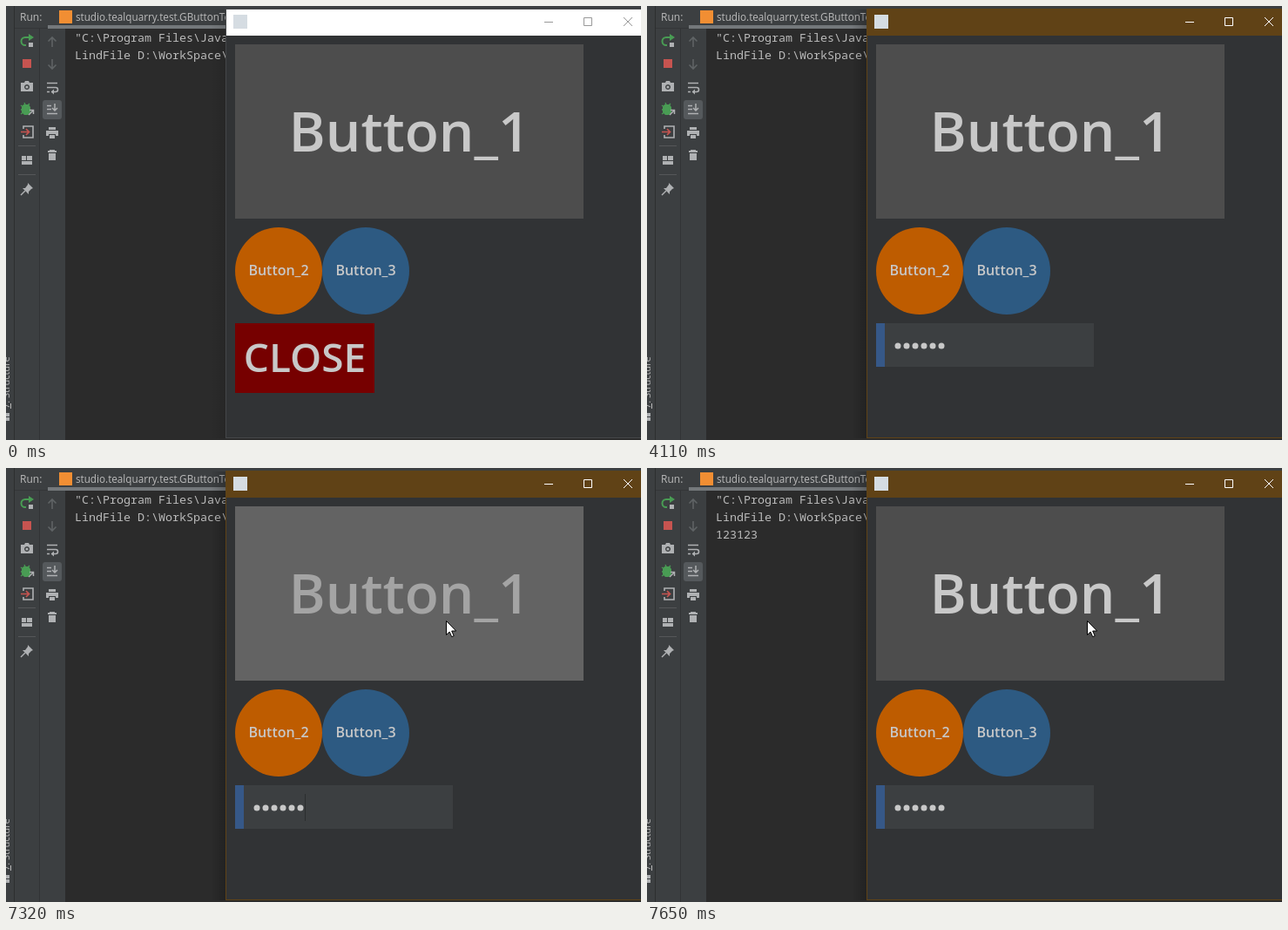
Write an HTML page with a canvas that moves like this. It is 729x498 px and loops after 8 s.

```html
<!DOCTYPE html>
<html lang="en">
<head>
<meta charset="utf-8">
<style>
html, body { margin: 0; height: 100%; overflow: hidden; background: #2b2b2b; }
canvas { display: block; }
</style>
</head>
<body>
<canvas id="stage" width="729" height="498"></canvas>
<script>
const ctx = document.getElementById('stage').getContext('2d');
const LOOP = 8000, STEP = 30;
const UI = '"Open Sans", "Noto Sans", sans-serif';
const MONO = '"Noto Sans Mono", "DejaVu Sans Mono", monospace';
const LIGHT = '#c8c8c8', PANEL = '#3c3f41', ICON = '#afb1b3', DIM = '#5f6365', GREEN = '#499c54', RED = '#c75450';

const FOCUS = 1290, FIELD = 1380, CLOSED = 1590;
const KEYS = [3030, 3090, 3330];
const CARET_BLINK = 475;

// Pointer moves: start, end, cubic path, whether it leaves the window
const MOVES = [
  { from: 360, to: 900, path: [695, 110, 300, 330, 170, 470, 385, 408] },
  { from: 3480, to: 4110, path: [386, 409, 430, 300, 600, 120, 735, 46], leaves: true },
  { from: 4470, to: 4860, path: [699, 109, 430, 230, 330, 420, 423, 412] },
  { from: 5340, to: 5760, path: [423, 412, 470, 290, 620, 110, 735, 40], leaves: true },
  { from: 6660, to: 6930, path: [722, 47, 640, 90, 550, 150, 505, 175] }
];

function rect(x, y, w, h, color) {
  ctx.fillStyle = color;
  ctx.fillRect(x, y, w, h);
}
function disc(x, y, r, color) {
  ctx.fillStyle = color;
  ctx.beginPath();
  ctx.arc(x, y, r, 0, 7);
  ctx.fill();
}
function text(str, x, y, font, color = LIGHT, align = 'left') {
  ctx.font = font;
  ctx.fillStyle = color;
  ctx.textAlign = align;
  ctx.fillText(str, x, y);
}
function stroke(d, color, width = 1.6) {
  ctx.strokeStyle = color;
  ctx.lineWidth = width;
  ctx.stroke(new Path2D(d));
}
function fill(d, color) {
  ctx.fillStyle = color;
  ctx.fill(new Path2D(d), 'evenodd');
}
const clamp = v => Math.max(0, Math.min(1, v));
const gray = v => `rgb(${v},${v},${v})`;
const mix = (a, b, k) => Math.round(a + (b - a) * k);

function drawIcons() {
  // Run column
  stroke('M29 36H22a4 4 0 0 0 0 9h1', GREEN, 2);
  fill('M26 32l6 4-6 4z', GREEN);
  rect(26, 42, 5, 5, ICON);
  rect(19, 61, 10, 10, RED);
  fill('M17 88h4l1-2h4l1 2h4v10H17zM24 90a3 3 0 1 0 .1 0z', ICON);
  disc(24, 93, 1.6, ICON);
  fill('M20 113h6l2 3v6l-3 3h-4l-3-3v-6z', GREEN);
  stroke('M17 114l3 2M17 119h3M17 124l3-2M27 112l-2 2M21 111l1 2', GREEN, 1.4);
  stroke('M26 125l5-5M27 119.500h4.500v4.500', ICON, 1.5);
  stroke('M20 141v-3h11v13H20v-3', ICON, 1.6);
  stroke('M17 144.500h9M23 141l3.500 3.500L23 148', RED, 1.7);
  rect(14, 160, 20, 1, '#555759');
  rect(18, 172, 5, 5, ICON);
  rect(24, 172, 6, 5, ICON);
  rect(18, 178, 12, 4, ICON);
  rect(14, 193, 20, 1, '#555759');
  fill('M25 203l6 6-2 1-3 3v3l-7-7h3l3-4z', ICON);
  stroke('M22 212l-5 5', ICON, 1.5);

  // Console column
  stroke('M53 47V36M48.500 40.500L53 36l4.500 4.500', DIM);
  stroke('M53 61v11M48.500 67.500L53 72l4.500-4.500', DIM);
  stroke('M47 88.500h12M47 93.500h10a2.500 2.500 0 0 1 0 5h-4M47 98.500h3', ICON);
  fill('M55 95.500v6l-3.500-3z', ICON);
  ctx.fillStyle = '#55595c';
  ctx.beginPath();
  ctx.roundRect(42, 108, 22, 22, 3);
  ctx.fill();
  stroke('M47 114.500h5M47 118.500h5M47 123.500h12M56 112v8M53 117l3 3 3-3', ICON, 1.5);
  rect(49, 139, 8, 3, ICON);
  fill('M46 143h14v6h-3v-2h-8v2h-3z', ICON);
  rect(50, 148, 6, 4, ICON);
  fill('M48 166h2v-1h6v1h2v2H48zM49 169h8v8h-8z', ICON);
}

function drawIde(t) {
  rect(0, 0, 729, 498, PANEL);
  rect(68, 26, 661, 472, '#2b2b2b');
  rect(9, 0, 1, 498, '#2d2f30');
  rect(38, 26, 1, 472, '#323436');
  rect(10, 25, 243, 1, '#343638');
  rect(48, 22, 205, 4, '#74787b');
  text('Run:', 16, 17, '12px ' + UI, '#bbbbbb');
  rect(61, 5, 15, 15, '#f18e33');
  text('studio.tealquarry.test.GButtonTest', 80, 17, '11.7px ' + UI, '#bbbbbb');
  drawIcons();

  const lines = ['"C:\\Program Files\\Java', 'LindFile D:\\WorkSpace\\'];
  if (t >= 7470) lines.push('123123');
  lines.forEach((line, i) => text(line, 79, 41 + 20 * i, '13.33px ' + MONO, '#bbbbbb'));

  ctx.save();
  ctx.translate(4, 462);
  ctx.rotate(-Math.PI / 2);
  text('7: Structure', 0, 0, '11px ' + UI, '#bbbbbb');
  rect(0, 1, 6, 1, '#bbbbbb');
  ctx.restore();
  rect(0, 467, 4, 4, ICON);
  rect(0, 472, 4, 4, ICON);
}

function drawFrame(focused) {
  const shade = ctx.createLinearGradient(235, 0, 253, 0);
  shade.addColorStop(0, 'rgba(0,0,0,0)');
  shade.addColorStop(1, focused ? 'rgba(0,0,0,.22)' : 'rgba(0,0,0,.1)');
  rect(235, 4, 18, 492, shade);
  rect(252, 3, 477, 493, focused ? '#5f4317' : '#454749');
  rect(253, 34, 476, 461, '#313335');
  rect(253, 4, 476, 30, focused ? '#604216' : '#ffffff');
  rect(261, 10, 16, 16, '#d5dce2');
  stroke('M618 18.500h10M663.500 13.500h9v9h-9zM709 13l10 10M719 13l-10 10', focused ? '#ffffff' : '#999999', 1);
}

function drawField(t) {
  const flash = t >= 5040 && t < 5130;
  rect(263, 364, 250, 50, flash ? '#4f5254' : PANEL);
  rect(263, 364, 10, 50, '#365888');
  const count = 3 + KEYS.filter(k => t >= k).length;
  for (let i = 0; i < count; i++) disc(288 + 10 * i, 390, 3.5, LIGHT);
  const typed = KEYS.filter(k => t >= k).pop() || CLOSED;
  if (Math.floor((t - typed) / CARET_BLINK) % 2 === 0) rect(283 + 10 * count, 374, 1, 31, '#2b2d2e');
}

function drawButtons(t) {
  const lit = t < 7440 ? clamp((t - 7290) / 120) : 1 - clamp(Math.floor((t - 7410) / 60) / 4);
  rect(263, 44, 400, 200, gray(mix(77, 166, lit)));
  text('Button_1', 463, 167, '600 64px ' + UI, gray(mix(200, 55, lit)), 'center');
  disc(313, 304, 50, '#be5c00');
  disc(413, 304, 50, '#2d5a82');
  text('Button_2', 313, 309, '600 16px ' + UI, LIGHT, 'center');
  text('Button_3', 413, 309, '600 16px ' + UI, LIGHT, 'center');
  if (t >= FIELD) drawField(t);
  if (t < CLOSED) {
    rect(263, 364, 160, 80, '#760000');
    text('CLOSE', 343, 420, '600 46px ' + UI, LIGHT, 'center');
  }
}

function pointerAt(t) {
  const move = MOVES.filter(m => t >= m.from).pop();
  if (!move || (move.leaves && t >= move.to)) return null;
  const k = clamp((t - move.from) / (move.to - move.from));
  const u = move.leaves ? k ** 1.6 : 1 - (1 - k) ** 1.8, v = 1 - u;
  const p = move.path;
  const at = i => v ** 3 * p[i] + 3 * v * v * u * p[i + 2] + 3 * v * u * u * p[i + 4] + u ** 3 * p[i + 6];
  return [Math.round(at(0)), Math.round(at(1))];
}

function drawPointer(t) {
  const pos = pointerAt(t);
  if (!pos) return;
  const [x, y] = pos;
  const inField = t >= CLOSED && x >= 263 && x < 513 && y >= 364 && y < 414;
  ctx.save();
  ctx.translate(x, y);
  if (inField) {
    stroke('M-3 -7.500h2.500l1 1 1-1H4M.5 -7v14M-3 7.500h2.500l1-1 1 1H4', '#e0e0e0', 1);
  } else {
    const arrow = 'M.5 .5v16l3.700-3.500 2.500 5.700 2.500-1.100-2.500-5.600h5z';
    fill(arrow, '#ffffff');
    stroke(arrow, '#000000', 1);
  }
  ctx.restore();
}

function draw(now) {
  const t = Math.floor(now % LOOP / STEP) * STEP;
  drawIde(t);
  drawFrame(t >= FOCUS);
  drawButtons(t);
  drawPointer(t);
  requestAnimationFrame(draw);
}
requestAnimationFrame(draw);
</script>
</body>
</html>
```
